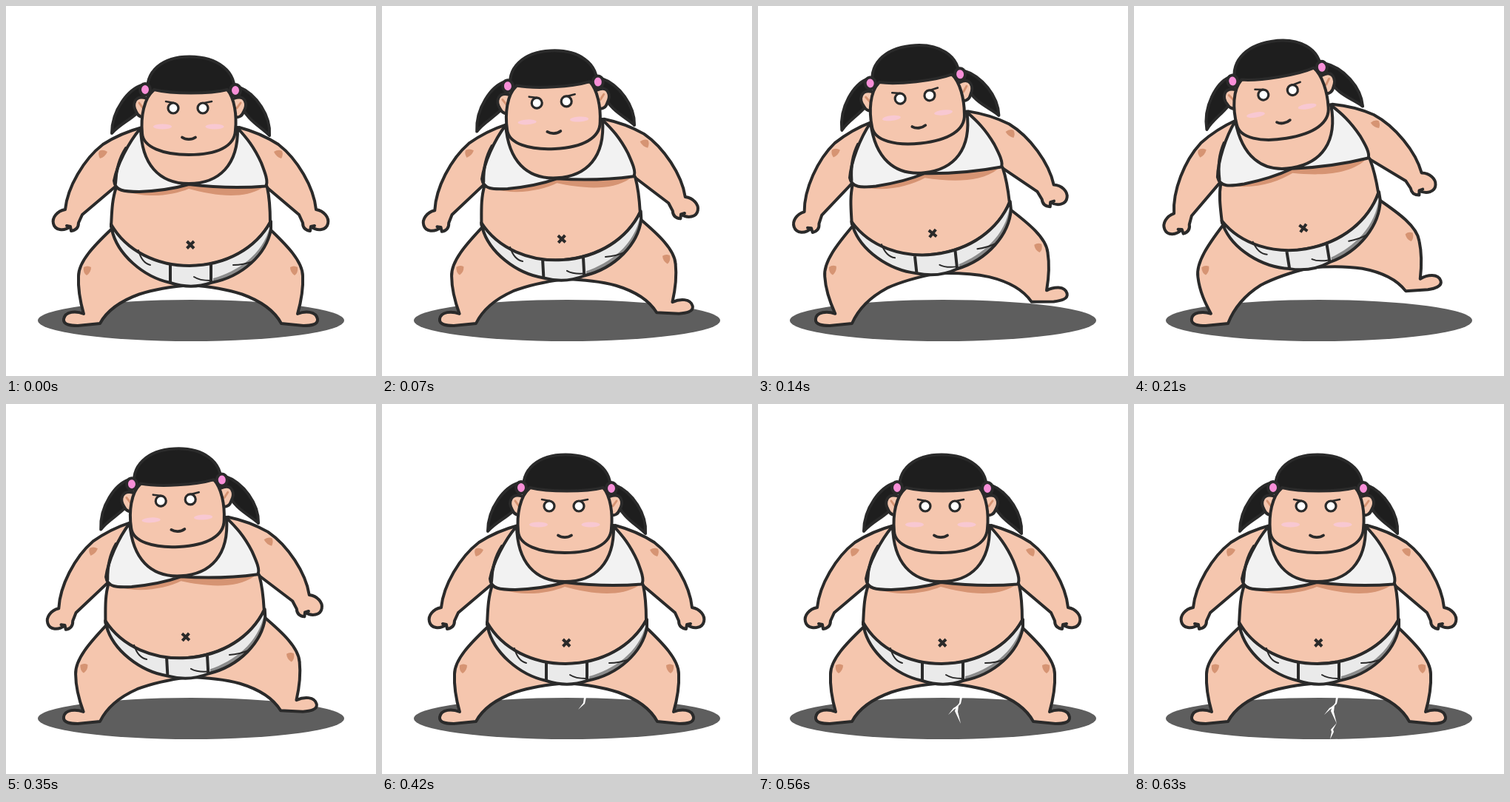
These frames come from a looping animation (500x500 px, 0.83 s). An HTML page:

```html
<!DOCTYPE html>
<html lang="en">
<head>
<meta charset="utf-8">
<title>Sumo stomp</title>
<style>
  html, body { margin: 0; width: 100%; height: 100%; overflow: hidden; background: #fff; }
  svg { display: block; width: 100%; height: 100%; }
  .line { fill: none; stroke: #2a2a2a; stroke-width: 4; stroke-linecap: round; stroke-linejoin: round; }
  .thin { stroke-width: 2; }
  .skin { fill: #f5c6ae; }
  .cloth { fill: #f2f2f2; }
  .brief { fill: #eaeaea; }
  .hair { fill: #1e1e1e; }
  .tan { fill: #d69473; }
  .blush { fill: #f8c8d2; }
  .bow { fill: #f88fd8; }
  .eye { fill: #fff; stroke-width: 3.2; }
</style>
</head>
<body>
<svg viewBox="0 0 500 500">
  <defs>
    <g id="arm">
      <path class="line skin" d="M184 164C165 169 145 178 131 187C105 207 83 245 80 275C69 277 62 286 64 294C66 303 78 305 87 298L82 297L87 298L88 304C95 303 98 299 98 293L103 282L149 243"/>
      <path class="tan" d="M126 196Q131 193 137 197Q134 204 127 206Q124 201 126 196Z"/>
    </g>
    <path id="knee" class="tan" d="M105 353Q110 350 115 353Q115 360 109 364Q104 361 105 353Z"/>
  </defs>

  <ellipse cx="250" cy="425" rx="207" ry="28" fill="#5e5e5e"/>
  <g id="crack" fill="#fff">
    <path d="M273 396H276L274 405L265 413L272 404Z"/>
    <path d="M274 405L267 411L257 420L264 411Z"/>
    <path d="M268 408L271 407L270 416L274 432L266 415Z"/>
    <path d="M274 431L269 440L270 443L265 453L267 443L266 440Z"/>
  </g>

  <path id="plantedLeg" class="line skin"/>
  <g id="body">
    <g transform="translate(499 0) scale(-1 1)">
      <path id="raisedLeg" class="line skin"/>
      <use href="#knee"/>
      <use href="#arm"/>
    </g>
    <use href="#arm"/>
    <path class="line skin" d="M182 166L149 245C143 262 143 280 142 298C170 345 205 352 248 351C300 350 340 325 357 292C357 275 356 259 353 245L313 164Z"/>
    <path class="tan" d="M158 249C190 261 225 256 247 247C280 256 320 262 346 246L247 241Z"/>

    <path class="brief" d="M142 295C163 332 205 351 248 351C297 351 337 328 358 291L358 302C352 335 320 366 277 374C260 380 240 380 222 374C185 366 150 335 143 302Z"/>
    <path d="M357 297C347 337 312 359 280 368V373C320 365 350 340 358 302Z" fill="#8c8c8c"/>
    <path class="line" d="M142 295C163 332 205 351 248 351C297 351 337 328 358 291L358 302C352 335 320 366 277 374C260 380 240 380 222 374C185 366 150 335 143 302ZM222 350V374M277 348V373"/>
    <path class="line thin" d="M179 330C182 342 187 348 195 350M307 350C318 350 326 348 334 345M254 366C260 370 267 371 276 371"/>
    <path class="line" d="M244.500 318L254 327.500M254 318L244.500 327.500" style="stroke-linecap:butt"/>

    <path class="line cloth" d="M182 165C165 185 150 215 146 236C147 250 160 251 180 251C205 250 230 246 247 241C280 245 320 246 351 243.500C355 238 350 225 345 212C335 190 325 178 313 165C314 215 288 240 247 240C206 240 183 213 182 165Z"/>
    <path class="line" d="M162 192Q149 212 148 240"/>
  </g>

  <g id="head">
    <path class="line hair" d="M184 107C166 112 143 140 143 172C155 157 179 150 186 132ZM314 109C339 119 358 149 356 175C345 163 325 155 316 130Z"/>
    <path class="line skin" d="M190 125C174 119 170 133 176 143C178 149 184 151 188 150M308 125C324 119 327 133 321 143C319 149 314 151 310 150"/>
    <path class="line" d="M180 131L185 138M317 131L312 138" style="stroke:#d69473;stroke-width:3"/>
    <path class="line skin" d="M200 113C186 125 182 150 184 172C185 191 213 201 247 201C285 201 309 190 310 168C312 148 309 125 299 113Z"/>
    <path class="line hair" d="M192 121C186 87 213 68.500 248 68.500C285 68.500 313 88 308 120L299 113C275 119 225 119 200 113Z"/>
    <g class="line">
      <ellipse class="bow" cx="188" cy="113" rx="7" ry="8"/>
      <ellipse class="bow" cx="310" cy="114" rx="7" ry="8"/>
    </g>
    <path class="line thin" d="M216 129L227 131M278 129L263 132" style="stroke-width:2.6"/>
    <circle class="line eye" cx="226" cy="138" r="7"/>
    <circle class="line eye" cx="266" cy="138" r="7"/>
    <ellipse class="blush" cx="211.500" cy="163" rx="12.500" ry="3.500"/>
    <ellipse class="blush" cx="282" cy="163" rx="12.500" ry="3.500"/>
    <path class="line" d="M238 177.500C243 181 251 181 256 177.500" style="stroke-width:3.8"/>
  </g>
  <use id="plantedKnee" href="#knee"/>
</svg>

<script>
const LOOP = 830, STEP = 70;
const TILT = [0, 1, 2, 3, 2.53, 1, 0];
const DEGREES = -3.1;
const CRACK_START = 6;
const PIVOT = { x: 100, y: 437 };
const LEG = "M142 302C120 323 98 345 98 365C97 385 101 402 105 416C95 412 80 412 78 423C77 431 88 432 97 432L127 429C135 414 151 400 180 389.5C200 383 225 379 250 377";

const byId = id => document.getElementById(id);
const clamp01 = v => Math.min(1, Math.max(0, v));
const cracks = [...byId("crack").children];

// The foot stays on the ground while the leg above it leans.
function leanLeg(degrees) {
  return LEG.replace(/([\d.]+) ([\d.]+)/g, (_, x, y) => {
    const a = degrees * clamp01((425 - y) / 30) * Math.PI / 180;
    const dx = x - PIVOT.x, dy = y - PIVOT.y;
    const px = PIVOT.x + dx * Math.cos(a) - dy * Math.sin(a);
    const py = PIVOT.y + dx * Math.sin(a) + dy * Math.cos(a);
    return `${px.toFixed(2)} ${py.toFixed(2)}`;
  });
}

function render(ms) {
  const step = Math.min(9, Math.floor((ms % LOOP) / STEP));
  const tilt = TILT[step] || 0;
  const angle = DEGREES * tilt;
  const rotate = `rotate(${angle} ${PIVOT.x} ${PIVOT.y})`;
  byId("body").setAttribute("transform", rotate);
  byId("plantedKnee").setAttribute("transform", rotate);
  byId("head").setAttribute("transform", `translate(${-0.4 * tilt} ${-0.5 * tilt}) ${rotate}`);
  byId("plantedLeg").setAttribute("d", leanLeg(angle));
  cracks.forEach((part, i) => {
    part.style.display = step >= CRACK_START + i ? "" : "none";
  });
}

byId("raisedLeg").setAttribute("d", LEG);
const start = performance.now();
function tick() {
  render(performance.now() - start);
  requestAnimationFrame(tick);
}
tick();
</script>
</body>
</html>
```
